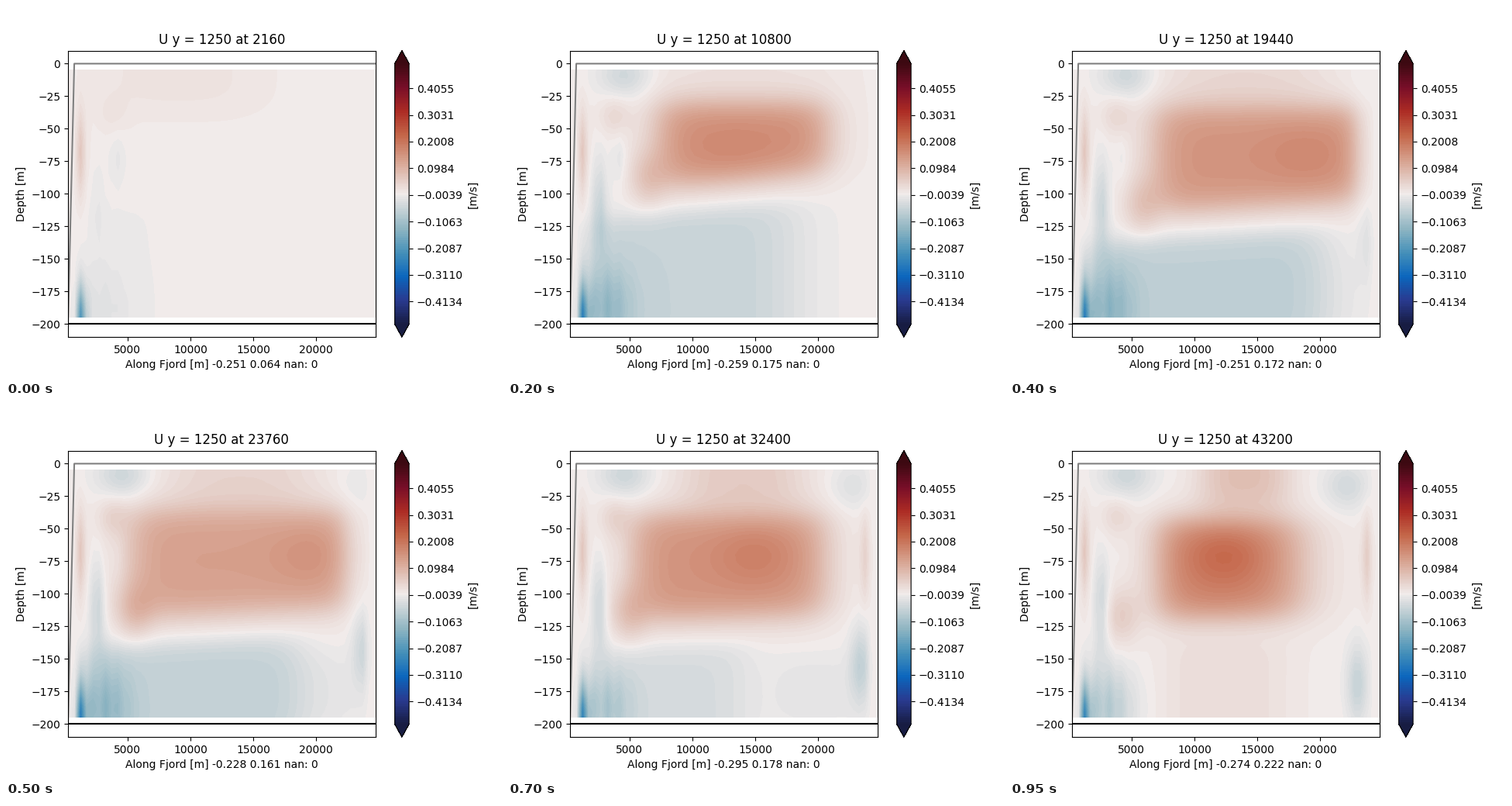
Animation, 640 px wide and 480 px high, one loop 1 s. Source, as a matplotlib script:

```python
import numpy as np
import matplotlib.pyplot as plt
from matplotlib.animation import FuncAnimation
from matplotlib.colors import LinearSegmentedColormap

FRAMES = 20
STEP = 2160
LEVELS = np.linspace(-0.5, 0.5, 128)

x = np.arange(0.25, 25, 0.5)        # km
z = np.arange(-195, 0, 5.0)         # m
X, Z = np.meshgrid(x, z)
# Flow vanishes at both end walls
WALLS = (np.clip(X - 0.25, 0, 1) * np.clip(24.75 - X, 0, 1)) ** 2
RIPPLE = 1 + 0.22 * np.cos(2 * np.pi * (X - 0.25)) * np.exp(-X / 6)


def path(t, *points):
    """Value at time t along a few (time, value) key points."""
    return np.interp(t, *zip(*points))


def ramp(t, start, end):
    return np.clip((t - start) / (end - start), 0, 1)


def edge(distance, softness):
    return 1 / (1 + np.exp(-distance / softness))


def bump(xc, zc, width, height, power=2):
    """Unit blob; width and height are its half-value radii."""
    return 2.0 ** -(np.abs((X - xc) / width) ** power
                    + np.abs((Z - zc) / height) ** power)


def outflow(t, bottom):
    amp = path(t, (0, 0), (2, .155), (6, .172), (10, .13), (19, .18))
    left = path(t, (0, 5), (6, 8.5), (10, 5.2), (16, 5.4), (19, 7.2))
    right = path(t, (0, 14), (2, 18), (6, 23.4), (12, 21.7),
                 (16, 19.1), (19, 18.2))
    top = -28 - 0.8 * t
    front = 0.3 + 0.18 * (24 - right)   # sharpens on reaching the wall
    body = (edge(X - left, 0.9) * edge(right - X, front)
            * edge(top - Z, 6.5) * edge(Z - bottom, 7))
    core = path(t, (2, 9), (6, 18), (10, 19.7), (12, 18), (16, 12),
                (19, 12.5))
    return amp * body + 0.0023 * t * bump(core, -70, 2.7, 20)


def return_flow(t, bottom):
    amp = path(t, (0, -.008), (2, -.055), (8, -.07), (12, -.06),
               (16, -.02), (19, .025))
    left = path(t, (12, 2), (19, 8))
    right = path(t, (0, 8), (2, 14), (6, 22), (12, 16.5), (16, 12), (19, 17))
    body = (edge(X - left, 0.8) * edge(right - X, 1 + 2 * np.exp(-t / 3))
            * edge(bottom - 21 - Z, 5))
    slow = path(t, (6, 0), (10, -.016), (16, -.018), (19, 0))
    return amp * body + slow * bump(20, -175, 3.5, 28, 3)


def surface(t):
    start = 0.014 * np.exp(-t) * bump(9, -8, 6, 28, 3)
    band = 0.004 * t * bump(14, -5, 8 - 0.25 * t, 28, 3)
    return start + band


def inner_end(t, grown, base):
    jet = 0.06 * bump(1.25, -68, 0.3, 27)
    sink = -0.22 * bump(1.25, -197, 0.35, 22)
    mixing = -(0.02 + 0.065 * grown) * RIPPLE * bump(2.9, -188, 1.8, 28)
    inflow = -0.052 * grown * bump(4.6, -9, 1.7, 14)
    streak = -(0.012 + 0.048 * grown) * bump(2.6, -110, 0.5, 30)
    eddy = -(0.016 + 0.025 * grown) * np.exp(-t / 8) * bump(4.2, -74, .5, 17)
    patch = (0.012 + 0.02 * grown) * bump(3.8, -40, 1, 12)
    lobe = 0.05 * grown * bump(7 - 0.15 * t, base, 1.2, 18)
    return jet + sink + mixing + inflow + streak + eddy + patch + lobe


def outer_end(t):
    top = -0.045 * ramp(t, 6, 19) * bump(24.6 - 0.13 * t, -17, 1.5, 15)
    deep = -0.065 * ramp(t, 6, 11) * bump(24.6 - 0.085 * t, -112 - 3 * t,
                                          0.7, 25)
    jet = 0.05 * ramp(t, 10, 15) * bump(23.8, -72, 0.35, 28)
    return top + deep + jet


def velocity(t):
    grown = 1 - np.exp(-t)
    base = -118 + 44 * np.exp(-(t / 6) ** 2)
    bottom = base + 1.4 * np.exp(-t / 9) * (X - 12)
    flow = (outflow(t, bottom) + return_flow(t, bottom) + surface(t)
            + inner_end(t, grown, base) + outer_end(t))
    return WALLS * flow + 0.001


def extremes(t):
    low = path(t, (0, -.251), (2, -.243), (6, -.274), (10, -.228),
               (12, -.286), (16, -.305), (19, -.274))
    high = path(t, (0, .064), (2, .167), (6, .184), (10, .161),
                (12, .164), (16, .193), (19, .222))
    return low, high


def balance_map():
    shades = [(23, 28, 66), (41, 58, 143), (11, 102, 189), (69, 144, 185),
              (142, 181, 194), (210, 216, 219), (230, 210, 204),
              (213, 157, 137), (196, 101, 72), (172, 43, 36),
              (120, 14, 40), (60, 9, 17)]
    stops = [(i / 11, np.array(c) / 255) for i, c in enumerate(shades)]
    stops.insert(6, (0.5, np.array((241, 236, 235)) / 255))
    return LinearSegmentedColormap.from_list("balance", stops, N=256)


CMAP = balance_map()
fig, ax = plt.subplots(figsize=(6.4, 4.8), dpi=100)


def draw_field(frame):
    return ax.contourf(x * 1000, z, velocity(frame), levels=LEVELS,
                       cmap=CMAP, extend="both")


field = draw_field(0)
fig.colorbar(field, ax=ax, label="[m/s]")
ax.plot([250, 750, 24750], [-200, 0, 0], color="gray")
ax.plot([250, 24750], [-200, -200], color="black")
ax.set(xlim=(250, 24750), ylim=(-210, 10), ylabel="Depth [m]")


def update(frame):
    global field
    field.remove()
    field = draw_field(frame)
    low, high = extremes(frame)
    ax.set_title(f"U y = 1250 at {STEP * (frame + 1)}")
    ax.set_xlabel(f"Along Fjord [m] {low:.3f} {high:.3f} nan: 0")
    return []


anim = FuncAnimation(fig, update, frames=FRAMES, interval=50, repeat=True,
                     repeat_delay=0, init_func=lambda: [])
plt.show()
```
